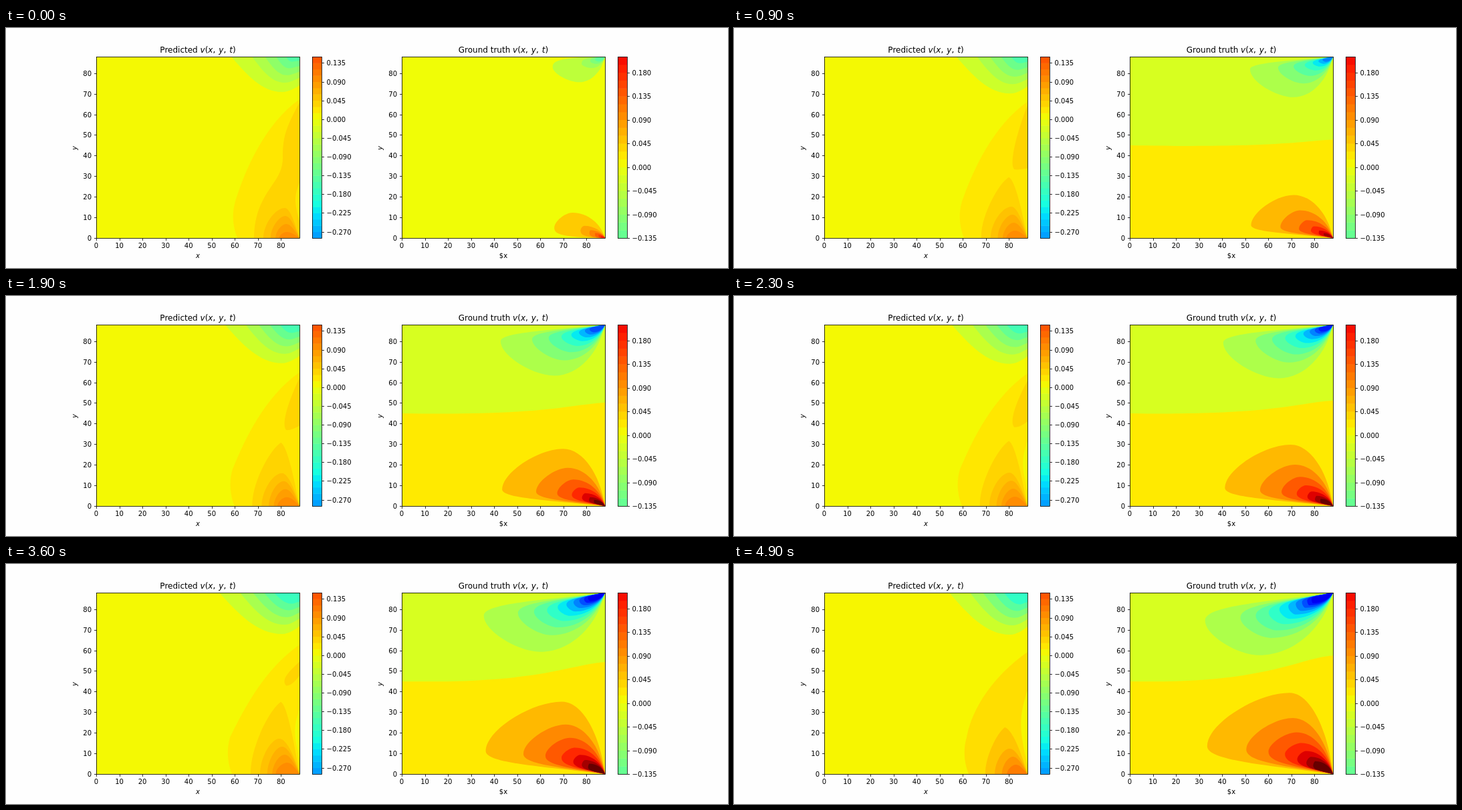
Animation, 1080 px wide and 360 px high, one loop 5 s. Source, as an HTML page:

```html
<!DOCTYPE html>
<html lang="en">
<head>
<meta charset="utf-8">
<title>Contour comparison</title>
<style>
html, body { margin: 0; width: 100%; height: 100%; overflow: hidden; background: #fefefe; }
svg { display: block; width: 1080px; height: 360px; font: 10px "DejaVu Sans", Verdana, sans-serif; }
.line { fill: none; stroke: #000; stroke-width: .8; }
.title { font-size: 12px; }
.it { font-style: italic; }
</style>
</head>
<body>
<svg viewBox="0 0 1080 360">
  <clipPath id="clipL"><rect x="135" y="43" width="304.5" height="272.5"/></clipPath>
  <clipPath id="clipR"><rect x="592" y="43" width="304.5" height="272.5"/></clipPath>
  <g id="left" clip-path="url(#clipL)"></g>
  <g id="right" clip-path="url(#clipR)"></g>
  <g id="axes"></g>
</svg>
<script>
const TOP = 43, BOTTOM = 315, W = 304, H = BOTTOM - TOP;
const $ = id => document.getElementById(id);
const clamp = (x, a = 0, b = 1) => Math.min(b, Math.max(a, x));

// Jet colour map over the field value
function color(v) {
  const p = .637 + 1.28 * v;
  const r = p > .89 ? 1 - (p - .89) / .22 : (p - .35) / .31;
  const g = Math.min((p - .125) / .25, (.91 - p) / .27);
  const b = p < .11 ? .5 + p / .22 : (.65 - p) / .31;
  return `rgb(${[r, g, b].map(c => Math.round(255 * clamp(c)))})`;
}

const shape = (d, v) => `<path d="${d}" fill="${color(v)}"/>`;
const box = (x, y, w, h, v) => `<rect x="${x}" y="${y}" width="${w}" height="${h}" fill="${color(v)}"/>`;

// ---- axes, labels and colour bars ----
const text = (x, y, s, anchor = 'middle', more = '') =>
  `<text x="${x}" y="${y}" text-anchor="${anchor}" ${more}>${s}</text>`;
const line = d => `<path class="line" d="${d}"/>`;
const frame = (x, w) => `<rect class="line" x="${x + .5}" y="${TOP + .5}" width="${w}" height="${H}"/>`;
const snap = x => Math.round(x) + .5;

function plot(x, name, xLabel) {
  const it = s => `<tspan class="it">${s}</tspan>`;
  const gap = s => `<tspan class="it" dx="1.2">${s}</tspan>`;
  let s = frame(x, W);
  for (let n = 0; n < 90; n += 10) {
    const tx = x + n * W / 88, ty = BOTTOM - n * H / 88;
    s += line(`M${snap(tx)},315.5v3.5`) + text(tx, 330, n);
    s += line(`M${x + .5},${snap(ty)}h-3.5`) + text(x - 7, Math.round(ty + 4), n, 'end');
  }
  s += text(x + W / 2, 37, `${name} ${it('v')}(${it('x')}, ${gap('y')}, ${gap('t')})`, 'middle', 'class="title"');
  s += text(x + W / 2, 344.5, xLabel);
  return s + text(0, 0, it('y'), 'middle', `transform="translate(${x - 29.5},180) rotate(-90)"`);
}

function bar(x, lo, hi, firstTick) {
  const n = Math.round((hi - lo) / .015), h = H / n;
  let s = '';
  for (let i = 0; i < n; i++) s += box(x, BOTTOM - (i + 1) * h, 14, h + .5, lo + (i + .5) * .015);
  s += frame(x, 14);
  for (let v = firstTick; v < hi - .001; v += .045) {
    const y = BOTTOM - (v - lo) / (hi - lo) * H;
    const label = (v < -.001 ? '\u2212' : '') + Math.abs(v).toFixed(3);
    s += line(`M${x + 14.5},${snap(y)}h3.5`) + text(x + 21.5, Math.round(y + 4), label, 'start');
  }
  return s;
}

$('axes').innerHTML =
  plot(135, 'Predicted', '<tspan class="it">x</tspan>') + bar(458, -.285, .15, -.27) +
  plot(592, 'Ground truth', '$x') + bar(915, -.135, .21, -.135);

// ---- left field; t in seconds ----
const EDGE = 439;

// Pointed hump on the bottom edge
function peak(a, x, y) {
  const h = BOTTOM - y, w = x - a, r = EDGE - x;
  return `M${a},315C${a - 1},${315 - .35 * h} ${x - .4 * w},${y + .12 * h} ${x},${y}` +
    `C${x + .4 * r},${y + .05 * h} ${EDGE - 5},${315 - .25 * h} ${EDGE},315Z`;
}

// Rounded hump on the bottom edge
function mound(a, x, y) {
  const h = BOTTOM - y, r = EDGE - x;
  return `M${a},315C${a},${315 - .45 * h} ${x - .45 * (x - a)},${y} ${x},${y}` +
    `C${x + .4 * r},${y} ${EDGE - 5},${315 - .35 * h} ${EDGE},315Z`;
}

// Bowl hanging from the top edge
function bowl(a, x, y) {
  const h = y - TOP, w = x - a, r = EDGE - x;
  return `M${a},43C${a + .3 * w},${TOP + .5 * h} ${x - .4 * w},${y} ${x},${y}` +
    `C${x + .4 * r},${y} ${EDGE - 6},${y - .12 * h} ${EDGE},${y - .19 * h}V43Z`;
}

const notch = (x, y0, y1) =>
  `M${EDGE},${y0}C${x},${y0 + .35 * (y1 - y0)} ${x},${y0 + .5 * (y1 - y0)} ${EDGE},${y1}Z`;

const hill = (a, y) =>
  `M${EDGE},${y}C385,${y + 38} 355,220 ${a + 3},260C${a - 3},280 ${a},300 ${a + 6},315H${EDGE}Z`;

function lens(y0, y1, y2) {
  return `M${EDGE},${y0}C424,${y0 + .4 * (y1 - y0)} 411,${y1 - 10} 419,${y1}Q427,${y1 + 1} ${EDGE},${y2}Z`;
}

function leftField(t) {
  const late = t >= 4.5, step = late ? .02 : .015, bg = step / 2;
  let s = box(135, TOP, W + 1, H + 1, bg);

  s += shape(late ? hill(345, 132) : hill(340 - 2.2 * t, 107 + 3.9 * t), 1.5 * step);
  if (late) {
    s += shape(notch(426, 190, 302), bg) + shape(peak(376, 405, 245), 2.5 * step);
  } else if (t < .9) {
    s += shape('M439,112C418,150 414,165 414,195C414,235 372,245 371,315H439Z', 2.5 * step);
    s += shape(notch(431 - 22 * t, 232 - 28 * t, 290 + 30 * t), 1.5 * step);
  } else {
    if (t < 4.3) s += shape(lens(114 + 2.5 * t * t, 222 - 11 * t, 225 - 16 * t), 2.5 * step);
    s += shape(peak(371 - 1.4 * t, 411, 225 - 1.4 * t * t), 2.5 * step);
    if (t > 2.2) s += shape(notch(430, 218, 292), bg);
  }

  const [a, x, y] = late ? [390, 412, 277] : [385 - 1.4 * t, 417 - 2.2 * t, 270 - 2.2 * t];
  for (let i = 0; i < (late ? 3 : 4); i++)
    s += shape(mound(a + 36 * (1 - .7 ** i), x + (1 + .8 * t) * i, y + 12 * i), (3.5 + i) * step);

  const start = late ? 322 : 337 - 5 * t, depth = 96 + Math.min(10, 2.5 * t);
  for (let i = 0; i < 5; i++)
    s += shape(bowl(start + 31 * i ** .7, 413 + 3.5 * i, depth - 14 * i ** .85), -.03 - i * (.029 + .0016 * t));
  return s;
}

// ---- right field; t in seconds ----
const CORNER = 896;

// Drop with its point in a corner; y counts away from the top or bottom edge
function drop(w, h, d, low, tail, up) {
  const a = CORNER - w, x = CORNER - d;
  const p = (px, y) => `${px},${up ? TOP + y : BOTTOM - y} `;
  return 'M' + p(CORNER, 0) +
    'C' + p(a + tail * w, low * tail * .9) + p(a, low * .5) + p(a, low) +
    'C' + p(a, low + .42 * (h - low)) + p(x - .4 * (x - a), h) + p(x, h) +
    'C' + p(x + .48 * d, h) + p(CORNER - .12 * d, .55 * h) + p(CORNER, 0) + 'Z';
}

function drops(t, step, up) {
  const g = t / (t + 1.4);   // growth that slows down
  const w1 = 56 + (up ? 174 : 170) * g;
  const w2 = (up ? 25 : 27) + (up ? 146 : 132) * g;
  const shrink = up ? .6 + .3 * g : .55 + .25 * g;
  const rise = up ? .49 : .5 + .03 * t;
  const limit = up ? .15 + .36 * g : .2 + .14 * g;
  const low = 14 + 5.7 * t, tail = Math.min(.4, .05 + .6 * t);
  let s = '';
  for (let v = step; v < limit; v += step) {
    const n = v / .04;
    const w = n < 2 ? w1 * (w2 / w1) ** Math.log2(n) : w2 * shrink ** (n - 2);
    const h = w * rise;
    const d = up ? (92 + 12 * t) * (1 - Math.exp(-w / 145)) : 68 * (1 - Math.exp(-w / 60));
    s += shape(drop(w, h, d, Math.min(low * (w / w1) ** .35, .64 * h), tail, up), (up ? -1 : 1) * (v + step / 2));
  }
  return s;
}

function rightField(t) {
  const [step, tint] = t < .8 ? [.03, .0115] : [.04, .02];
  let s = box(592, TOP, W + 1, H + 1, t < .2 ? .004 : tint);
  if (t >= .2) {
    const y = 174 - 7.5 * t;
    s += shape(`M592,43V176C800,180 845,${y + 3} ${CORNER + 1},${y}V43Z`, -tint);
  }
  return s + drops(t, step, false) + drops(t, step, true);
}

// ---- playback: a new field every 100 ms ----
let shown = -1;
function tick() {
  const n = Math.floor(performance.now() % 5000 / 100);
  if (n !== shown) {
    shown = n;
    $('left').innerHTML = leftField(n / 10);
    $('right').innerHTML = rightField(n / 10);
  }
  requestAnimationFrame(tick);
}
tick();
</script>
</body>
</html>
```
